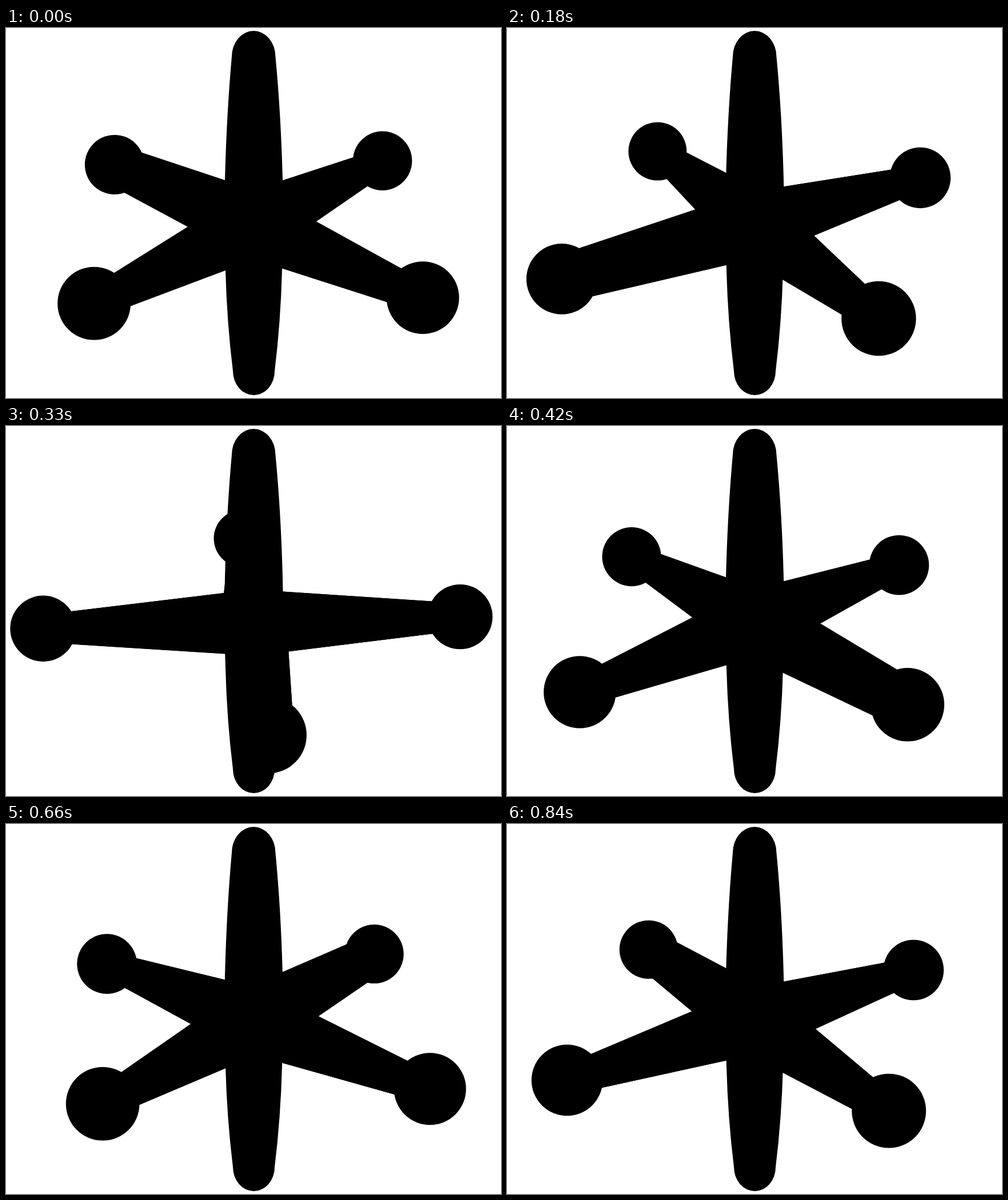
Write an HTML page with a canvas that moves like this. It is 866 px wide and 647 px high and loops after 870 ms.

```html
<!DOCTYPE html>
<html lang="en">
<head>
<meta charset="utf-8">
<title>Spinning jack</title>
<style>
  html, body { margin: 0; width: 100%; height: 100%; overflow: hidden; background: #fff; }
  canvas { display: block; width: 100vw; height: 100vh; }
</style>
</head>
<body>
<canvas id="stage" width="866" height="647"></canvas>
<script>
const ctx = document.getElementById('stage').getContext('2d');

const STEP = 30, STEPS = 29;           // ms per pose, poses per turn
const CX = 433, CY = 343.8;            // projected hub
const REACH = 365.4, BALL = 57.2, HUB = 58;
const TIPS = [24, 24, 38.6, 24];       // arm radius at each ball
const TILT = 0.48, DIST = 2243;        // camera pitch and distance
const START = 43.05 * Math.PI / 180;
const SLICES = 24;
const sinT = Math.sin(TILT), cosT = Math.cos(TILT);

const post = new Path2D(
  'M395 50 A38.2 45 0 0 1 471.4 50 Q481 150 484 266 Q486 345 483 422' +
  'Q480.5 515 470 600 A36.5 42 0 0 1 397 600 Q386.5 515 384 424 Q381 345 383 265 Q386 150 395 50Z');

// x: right, z: toward the viewer, h: up
function project(x, z, h) {
  const s = 1 / (1 - (z * cosT + h * sinT) / DIST);
  return { x: CX + x * s, y: CY + (z * sinT - h * cosT) * s, s };
}

// Point on the rim of an arm: distance along it, radius, angle around it
function rim(turn, along, radius, around) {
  const c = Math.cos(turn), s = Math.sin(turn);
  const side = radius * Math.cos(around);
  return project(along * c - side * s, along * s + side * c, radius * Math.sin(around));
}

function drawArm(turn, tip) {
  for (let i = 0; i < SLICES; i++) {
    const a = Math.PI * i / SLICES, b = a + Math.PI;
    const corners = [
      rim(turn, 0, HUB, a), rim(turn, REACH, tip, a),
      rim(turn, REACH, tip, b), rim(turn, 0, HUB, b)
    ];
    ctx.beginPath();
    corners.forEach(p => ctx.lineTo(p.x, p.y));
    ctx.fill();
  }
  const ball = rim(turn, REACH, 0, 0);
  ctx.beginPath();
  ctx.arc(ball.x, ball.y, BALL * ball.s, 0, 2 * Math.PI);
  ctx.fill();
}

function draw() {
  const pose = Math.floor(performance.now() / STEP) % STEPS;
  const spin = START - 2 * Math.PI * pose / STEPS;
  ctx.fillStyle = '#fff';
  ctx.fillRect(0, 0, 866, 647);
  ctx.fillStyle = '#000';
  ctx.fill(post);
  TIPS.forEach((tip, i) => drawArm(spin + i * Math.PI / 2, tip));
  requestAnimationFrame(draw);
}
draw();
</script>
</body>
</html>
```
